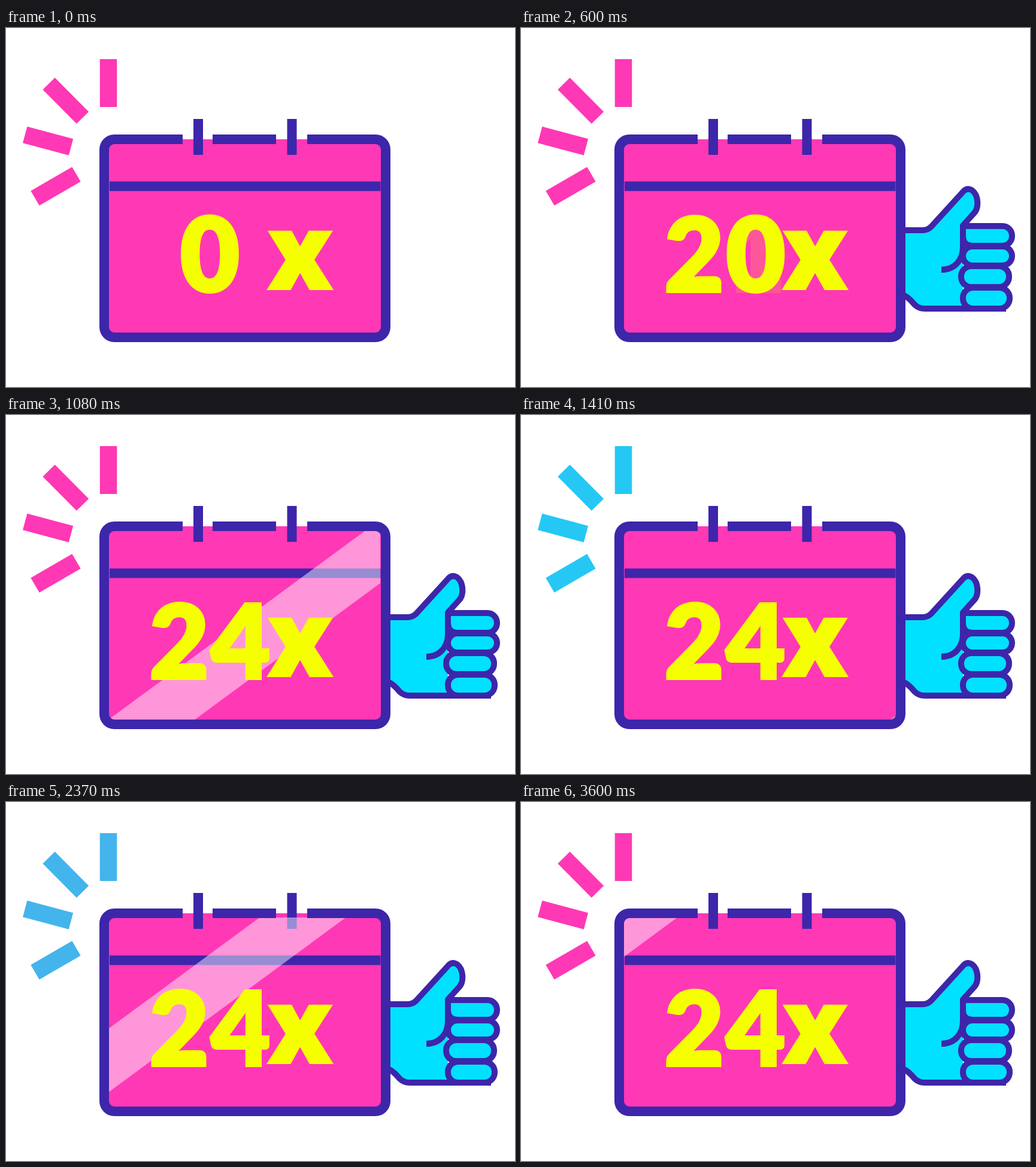
An HTML page for the animation above (3630 ms loop, 850x600 px).

```html
<!DOCTYPE html>
<html lang="en">
<head>
<meta charset="utf-8">
<title>Calendar counter</title>
<style>
  html, body { margin: 0; width: 100%; height: 100%; overflow: hidden; background: #fff; }
  svg { display: block; }
  .ink { fill: none; stroke: #3d26aa; }
  .skin { fill: #00e1ff; stroke: #3d26aa; stroke-width: 10; stroke-linejoin: round; stroke-linecap: butt; }
  text { fill: #f6ff00; stroke: #f6ff00; text-anchor: middle; }
  .number { font: 900 172px Lato, sans-serif; stroke-width: 4px; letter-spacing: 3px; }
  .times { font: 800 175px "Open Sans", sans-serif; stroke-width: 2px; }
</style>
</head>
<body>
<svg width="850" height="600" viewBox="0 0 850 600">
  <defs>
    <clipPath id="page"><rect x="172" y="193" width="453" height="319"/></clipPath>
    <g id="hand" class="skin">
      <path d="M600 338H670Q679 338 685 332L737 275Q744 266 753 271C764 279 765 300 757 309L738 330V469H674Q664 469 657 462Q648 451 640 447H600Z" stroke="none"/>
      <path d="M600 338H670Q679 338 685 332L737 275Q744 266 753 271C764 279 765 300 757 309L738 330V366C738 388 724 404 702 404" fill="none"/>
      <path d="M810 469H674Q664 469 657 462Q648 451 640 447H600" fill="none"/>
      <path d="M738 331H804A16 16.5 0 0 1 804 364H755Q738 364 738 347Z"/>
      <rect x="738" y="365" width="82" height="32" rx="16"/>
      <rect x="735" y="398" width="80" height="35" rx="17"/>
      <rect x="738" y="434" width="78" height="35" rx="17"/>
    </g>
  </defs>

  <path id="rays" fill="none" stroke-width="28.5"
    d="M171 52V132M71.5 93L128 150M31.7 178.5L108.5 199M117.5 244.5L48.5 284.5"/>
  <g id="hands"></g>

  <rect x="164" y="186" width="470" height="331" rx="16" fill="#ff38b6"/>
  <path class="ink" stroke-width="16" d="M173 264.5H625.5M321 152V212M477.5 152V212"/>
  <g clip-path="url(#page)">
    <path id="shine" fill="#fff" fill-opacity=".47" d="M0 193h-144l-433 319h144z"/>
  </g>
  <path class="ink" stroke-width="16"
    d="M345 186H451M503 186H617A17 17 0 0 1 634 203V500A17 17 0 0 1 617 517H181A17 17 0 0 1 164 500V203A17 17 0 0 1 181 186H295"/>

  <text id="nextNumber" class="number" x="342" y="441"></text>
  <text id="number" class="number" x="342" y="441"></text>
  <text class="times" x="491" y="437">x</text>
</svg>

<script>
const LOOP = 3630, STEP = 30, COUNT_START = 210, COUNT_END = 720;
const PINK = [255, 56, 182], CYAN = [0, 225, 255];
const SWEEPS = [656, 2077, 3534];
const BLUR_COPIES = 6;

const byId = id => document.getElementById(id);
const clamp = v => Math.max(0, Math.min(1, v));
const [rays, shine, number, nextNumber] = ['rays', 'shine', 'number', 'nextNumber'].map(byId);

byId('hands').innerHTML = Array.from({ length: BLUR_COPIES },
  (_, i) => `<use href="#hand" opacity="${1 / (i + 1)}"/>`).join('');
const hands = [...byId('hands').children];

// Slow fade from pink to cyan, quick return, then rest
function rayColor(t) {
  const phase = t < 208 ? 0 : (t - 208) % 495;
  const mix = Math.min(phase / 248, clamp((285 - phase) / 37));
  return `rgb(${PINK.map((p, i) => Math.round(p + (CYAN[i] - p) * mix))})`;
}

const handScale = t => clamp((t - COUNT_START) / 217);

// Copies grow from small to large, averaging into a zoom blur
function drawHand(t) {
  const moving = handScale(t) < 1;
  hands.forEach((hand, i) => {
    const s = handScale(t - (moving ? (BLUR_COPIES - 1 - i) * 2.5 : 0));
    hand.style.display = s > 0 && (moving || i === 0) ? '' : 'none';
    hand.setAttribute('transform', `translate(600 441) scale(${s}) translate(-600 -441)`);
  });
}

function drawNumber(t) {
  const p = clamp((t - COUNT_START) / (COUNT_END - COUNT_START));
  const value = Math.floor(24 * p * p * (3 - 2 * p));
  number.textContent = value;
  nextNumber.textContent = p > 0 && p < 1 ? value + 1 : '';
  nextNumber.setAttribute('opacity', .15);
}

function drawShine(t) {
  const start = SWEEPS.findLast(s => s <= t) ?? t;
  shine.setAttribute('transform', `translate(${172 + 1.35 * (t - start)} 0)`);
}

const origin = performance.now();
function draw(now) {
  const elapsed = Math.max(0, now - origin) % LOOP;
  const t = Math.floor(elapsed / STEP) * STEP;
  rays.setAttribute('stroke', rayColor(t));
  drawHand(t);
  drawNumber(t);
  drawShine(t);
  requestAnimationFrame(draw);
}
draw(origin);
</script>
</body>
</html>
```
